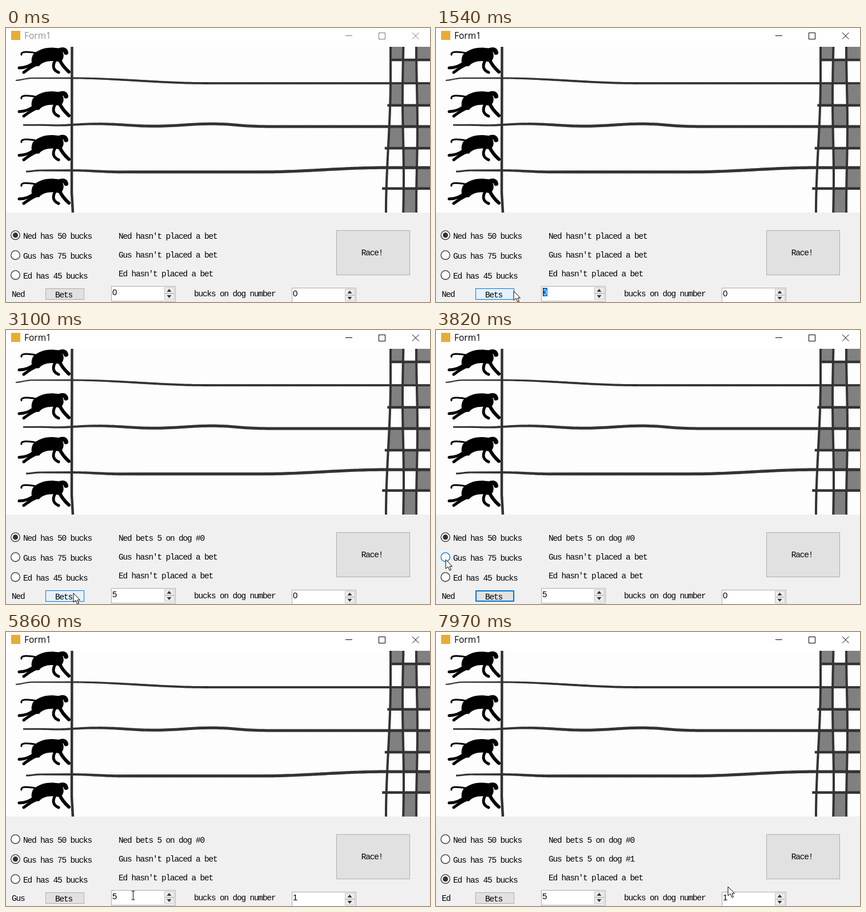
These frames come from a looping animation (742x481 px, 8000 ms). An HTML page with a canvas:

```html
<!DOCTYPE html>
<html lang="en">
<head>
<meta charset="utf-8">
<title>Form1</title>
<style>
html, body { margin: 0; width: 100%; height: 100%; overflow: hidden; background: #f0f0f0; }
canvas { display: block; }
</style>
</head>
<body>
<canvas id="stage" width="742" height="481"></canvas>
<script>
const ctx = document.getElementById('stage').getContext('2d');
const LOOP = 8000, STEP = 62;
const INK = '#333', BLUE = '#0078d7';

const PLAYERS = [
  { name: 'Ned', cash: 50, betAt: 2740, bet: '5 on dog #0' },
  { name: 'Gus', cash: 75, betAt: 6150, bet: '5 on dog #1' },
  { name: 'Ed', cash: 45, betAt: Infinity }
];

const SPOT = {
  entry: [530, 380], label: [323, 443], amount: [236, 463],
  bets: [134, 459], betsLow: [136, 462], betsMid: [118, 462],
  radio2: [17, 403], radio3: [21, 437], below: [54, 446],
  up: [600, 464], rest: [511, 447]
};

const MOVES = [
  [100, 410, 'label'], [660, 900, 'amount'], [1130, 1430, 'betsLow'],
  [2160, 2470, 'bets'], [2800, 3100, 'betsMid'], [3350, 3820, 'radio2'],
  [4120, 4620, 'up'], [5430, 5990, 'betsMid'], [6240, 6540, 'below'],
  [6600, 6860, 'radio3'], [7660, 7970, 'rest']
];

const between = (t, a, b) => t >= a && t < b;
const inside = (p, x, y, w, h) => p.x >= x && p.x <= x + w && p.y >= y && p.y <= y + h;

function ease(a, b, v) {
  const f = Math.min(1, Math.max(0, (v - a) / (b - a)));
  return f * f * (3 - 2 * f);
}

// The pointer advances in small jumps, as in a screen recording.
function pointerAt(t) {
  let [x, y] = SPOT.entry;
  for (const [start, end, name] of MOVES) {
    if (t < start) break;
    const steps = Math.round((end - start) / STEP) + 1;
    const gap = (end - start) / (steps - 1);
    const e = ease(0, steps, Math.floor((t - start) / gap + 1e-6) + 1);
    x += (SPOT[name][0] - x) * e;
    y += (SPOT[name][1] - y) * e;
  }
  return { x, y };
}

function fill(color, x, y, w, h) {
  ctx.fillStyle = color;
  ctx.fillRect(x, y, w, h);
}

function box(x, y, w, h, bg, border, line = 1) {
  fill(bg, x, y, w, h);
  ctx.strokeStyle = border;
  ctx.lineWidth = line;
  ctx.strokeRect(x + line / 2, y + line / 2, w - line, h - line);
}

function polygon(points, color, dx = 0, dy = 0) {
  ctx.beginPath();
  for (let i = 0; i < points.length; i += 2) ctx.lineTo(points[i] + dx, points[i + 1] + dy);
  ctx.closePath();
  ctx.fillStyle = color;
  ctx.fill();
}

function lines(width, color, ...segments) {
  ctx.lineWidth = width;
  ctx.strokeStyle = color;
  ctx.beginPath();
  for (const [x1, y1, x2, y2] of segments) {
    ctx.moveTo(x1, y1);
    ctx.lineTo(x2, y2);
  }
  ctx.stroke();
}

// Courier-like text set on the 7.5 px grid of the form's font
function text(s, x, y, align = 'left') {
  const size = 14.5;
  ctx.font = `${size}px "Liberation Mono", monospace`;
  ctx.letterSpacing = `${7.5 - size * 0.6}px`;
  ctx.textAlign = align;
  ctx.fillStyle = '#000';
  ctx.fillText(s, x, y);
  ctx.letterSpacing = '0px';
  ctx.textAlign = 'left';
}

function titleBar(active) {
  fill('#fff', 0, 0, 742, 33);
  fill('#e8ac35', 9, 5, 16, 16);
  ctx.font = '15.5px "Open Sans", "Noto Sans", sans-serif';
  ctx.fillStyle = active ? '#000' : '#929292';
  ctx.fillText('Form1', 32, 19);
  lines(1, active ? '#000' : '#777',
    [594, 13.5, 606, 13.5], [711, 8, 722.5, 19.5], [722.5, 8, 711, 19.5]);
  ctx.strokeRect(652.5, 8.5, 11, 11);
}

function limb(width, x1, y1, bx, by, x2, y2) {
  ctx.lineWidth = width;
  ctx.beginPath();
  ctx.moveTo(x1, y1);
  ctx.quadraticCurveTo(bx, by, x2, y2);
  ctx.stroke();
}

function dog(y) {
  ctx.save();
  ctx.translate(20, y);
  ctx.fillStyle = ctx.strokeStyle = '#000';
  ctx.lineCap = 'round';
  ctx.beginPath();
  ctx.moveTo(27, 15);
  ctx.bezierCurveTo(38, 4, 54, 0, 74, 4);
  ctx.bezierCurveTo(84, 12, 82, 24, 74, 28);
  ctx.bezierCurveTo(60, 24, 44, 26, 38, 35);
  ctx.bezierCurveTo(30, 36, 20, 32, 27, 15);
  ctx.fill();
  limb(3, 7, 15, 5, 7, 32, 12);
  limb(8, 72, 8, 83, 3, 85, 11);
  limb(5, 30, 28, 18, 38, 3, 38);
  limb(5, 34, 32, 24, 36, 11, 46);
  limb(6, 74, 24, 78, 34, 90, 45);
  limb(5, 66, 25, 58, 40, 72, 46);
  ctx.restore();
}

const LANES = [
  { x: 17, w: 3.8, y: x => 92 - 4 * ease(16, 45, x) + 9 * ease(115, 350, x) },
  { x: 30, w: 5, y: x => 170.3 + 2.7 * ease(380, 480, x)
      - 2 * Math.cos((x - 160) * Math.PI / 100) * ease(60, 120, x) * (1 - ease(380, 480, x)) },
  { x: 35, w: 5.2, y: x => 252 - 2 * ease(35, 60, x) + 2.7 * ease(115, 200, x) - 7.5 * ease(450, 660, x) }
];

function lane({ x, w, y }) {
  for (; x < 742; x += 6)
    lines(w * (0.55 + 0.45 * ease(0, 250, x)), INK, [x, y(x), x + 6.5, y(x + 6.5)]);
}

const rowY = i => i < 0 ? 33 : i > 6 ? 324 : 56 + 41 * i - 0.56 * i * i;
const colX = (k, y) => k ? 671 + 24 * k + Math.sin(y / 45 + k * 2) : 673 - 8 * ease(90, 324, y);

function finish() {
  for (let r = 0; r < 8; r++)
    for (let c = r % 2; c < 3; c += 2) {
      if (r === 6 && c === 0) continue;
      const top = rowY(r - 1), bottom = rowY(r);
      polygon([colX(c, top), top, colX(c + 1, top), top,
        colX(c + 1, bottom), bottom, colX(c, bottom), bottom], '#808080');
    }
  for (let k = 0; k < 3; k++)
    for (let y = 33; y < 324; y += 6) lines(4, INK, [colX(k, y), y, colX(k, y + 6.5), y + 6.5]);
  for (let i = 0; i < 7; i += 2) lines(4.5, INK, [672 - 2.3 * i, rowY(i), 742, rowY(i)]);
}

function track() {
  ctx.save();
  ctx.beginPath();
  ctx.rect(0, 33, 742, 291);
  ctx.clip();
  fill('#fdfdfd', 0, 33, 742, 291);
  finish();
  for (let i = 0; i < 4; i++) dog(32 + 76.7 * i);
  lines(4.5, INK, [115.5, 33, 115, 290], [115, 289, 117, 324]);
  LANES.forEach(lane);
  ctx.restore();
}

function radio(y, checked, hover, pressed) {
  const disc = r => {
    ctx.beginPath();
    ctx.arc(16.5, y, r, 0, 7);
  };
  disc(7.8);
  ctx.fillStyle = pressed ? '#cce4f7' : '#fff';
  ctx.fill();
  ctx.strokeStyle = hover ? BLUE : INK;
  ctx.lineWidth = 1.3;
  ctx.stroke();
  if (!checked) return;
  disc(4.6);
  ctx.fillStyle = hover ? BLUE : INK;
  ctx.fill();
}

function spinner(x, y, value, baseline, p, { selected, caret, pressed } = {}) {
  box(x, y, 113, 27, '#fff', '#abadb3');
  if (selected) fill(BLUE, x + 3, y + 3, 8, 15);
  ctx.font = '15px "Liberation Sans", Arial, sans-serif';
  ctx.fillStyle = selected ? '#fff' : '#000';
  ctx.fillText(value, x + 2, baseline);
  if (caret) fill('#000', x + caret, y + 3, 1, 15);
  for (const up of [true, false]) {
    const by = y + (up ? 2 : 13);
    const hover = inside(p, x + 94, by, 17, 11);
    const bg = hover && up && pressed ? '#cce4f7' : hover ? '#e5f1fb' : '#ececec';
    box(x + 93, by, 18, 11, bg, hover ? BLUE : '#c4c4c4');
    const cx = x + 101.5, cy = by + 5.5, d = up ? -2.5 : 2.5;
    polygon([cx - 4, cy - d, cx + 4, cy - d, cx, cy + d], INK);
  }
}

function betButton(p, pressed, focused) {
  const hover = inside(p, 69, 457, 68, 20);
  const bg = pressed ? '#cce4f7' : hover ? '#e5f1fb' : '#e1e1e1';
  const border = pressed ? '#005499' : hover || focused ? BLUE : '#adadad';
  box(69, 457, 68, 20, bg, border, focused && !hover ? 2 : 1);
  text('Bets', 101, 473, 'center');
}

function pointer({ x, y }, beam) {
  if (beam) {
    const cx = Math.round(x) + 0.5;
    lines(1, '#000', [cx - 3, y - 7.5, cx + 3, y - 7.5],
      [cx, y - 7.5, cx, y + 7.5], [cx - 3, y + 7.5, cx + 3, y + 7.5]);
    return;
  }
  polygon([0, 0, 0, 16, 4, 12.5, 7, 19, 9.5, 18, 6.8, 12, 11.5, 12], '#fff', x, y);
  ctx.strokeStyle = '#000';
  ctx.lineWidth = 1;
  ctx.stroke();
}

function draw(t) {
  const p = pointerAt(t);
  const chosen = t < 4060 ? 0 : t < 7290 ? 1 : 2;
  const pressed = between(t, 2650, 2740) || between(t, 6060, 6150);
  const focused = between(t, 2650, 4060) || between(t, 6060, 7290);
  const typed = t >= 2220;

  fill('#f0f0f0', 0, 0, 742, 481);
  titleBar(t >= 1130);
  track();

  PLAYERS.forEach(({ name, cash, betAt, bet }, i) => {
    const y = 363.7 + 35 * i;
    const hover = inside(p, 8, y - 9, 142, 18);
    const down = hover && (between(t, 4000, 4060) || between(t, 7230, 7290));
    radio(y, i === chosen, hover, down);
    text(`${name} has ${cash} bucks`, 30, Math.round(y) + 6);
    text(`${name} ${t >= betAt ? 'bets ' + bet : "hasn't placed a bet"}`, 197, 370 + 33 * i);
  });

  box(578, 355, 129, 79, '#e1e1e1', '#adadad');
  text('Race!', 640.5, 399, 'center');
  text(PLAYERS[chosen].name, 10, 472);
  betButton(p, pressed, focused);

  const caret = typed ? (t < 2650 ? 10 : 0) : between(t, 1380, 1910) ? 3 : 0;
  spinner(184, 453, typed ? '5' : '0', 469, p, { selected: between(t, 1360, 2220), caret });
  text('bucks on dog number', 329, 471);
  spinner(500, 456, t >= 5250 ? '1' : '0', 471, p, { pressed: between(t, 5250, 5340) });

  if (t < 100) return;
  const overField = inside(p, 186, 455, 91, 22) || inside(p, 502, 458, 91, 22);
  pointer(p, overField || between(t, 1130, 1430));
}

const begin = performance.now();
function tick() {
  draw((performance.now() - begin) % LOOP);
  requestAnimationFrame(tick);
}
tick();
</script>
</body>
</html>
```
